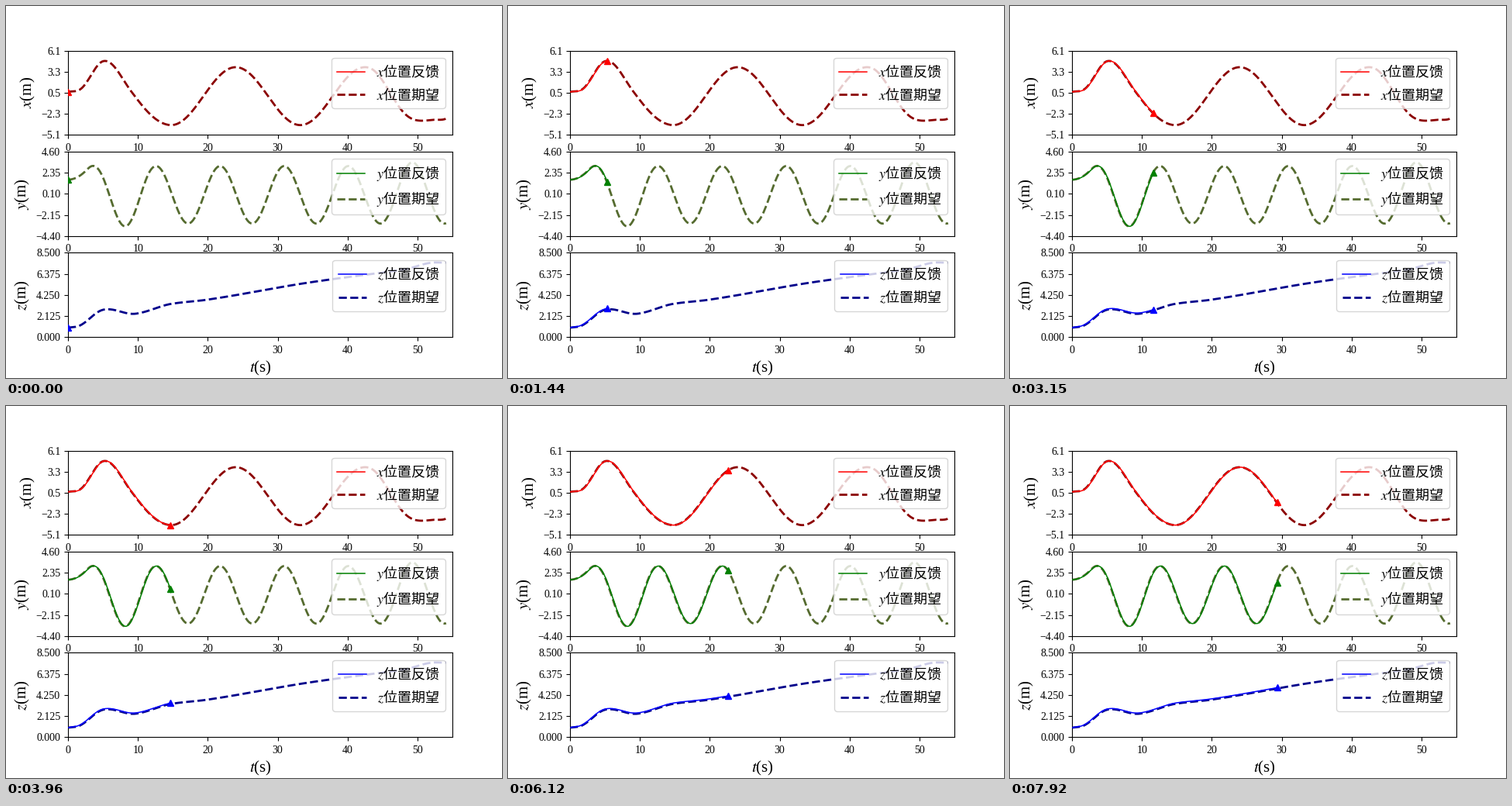
These frames come from a looping animation (640x480 px, 8000 ms). A matplotlib script:

```python
import numpy as np
import matplotlib.pyplot as plt
from matplotlib.animation import FuncAnimation

plt.rcParams.update({
    "font.family": "Liberation Serif",
    "mathtext.fontset": "stix",
    "xtick.major.pad": 4,
})

FRAMES = 89
LOOP_MS = 8000
STEP = 1 / 3  # plotted seconds per frame
T_END = 54.1


def swing(t, *keys):
    """Cosine ease from key to key, each key a (time, value) pair."""
    x, y = np.array(keys).T
    i = np.clip(np.searchsorted(x, t, side="right") - 1, 0, len(x) - 2)
    p = np.clip((t - x[i]) / (x[i + 1] - x[i]), 0, 1)
    return y[i] + (y[i + 1] - y[i]) * (1 - np.cos(np.pi * p)) / 2


def wave(t, size, peak, period):
    return size * np.cos(2 * np.pi * (t - peak) / period)


# Each path is a steady motion plus its run-in and run-out.
def x_path(t):
    return wave(t, 3.85, 24, 18.5) + swing(
        t, (-1, 2.3), (2.3, -0.35), (5.1, 0.9), (9.1, -0.7), (14.5, 0.05),
        (43, 0.05), (47.4, -1.05), (52, 0.72), (55, -0.5))


def y_path(t):
    return wave(t, 3.07, 21.77, 9.17) + swing(
        t, (-1.2, 4.7), (2.9, -0.05), (5.4, 0.43), (8.9, -0.4), (12, 0),
        (46, 0), (49.2, 0.4), (52.5, 0))


def z_path(t):
    return 1.82 + 0.104 * t + swing(
        t, (0, -0.87), (1.1, -0.9), (5.2, 0.42), (9.8, -0.47), (15, 0),
        (20, -0.12), (35, 0.1), (48, 0), (51.8, 0.28), (55, 0))


def late(path):
    return lambda t: path(np.maximum(t - 0.06, 0))


def z_real(t):
    return z_path(t) + 0.08 * (1 - np.exp(-t / 1.5))


ROWS = [
    ("x", x_path, late(x_path), "red", "darkred", (-5.1, 6.1)),
    ("y", y_path, late(y_path), "green", "darkolivegreen", (-4.4, 4.6)),
    ("z", z_path, z_real, "blue", "darkblue", (0, 8.5)),
]

fig, axes = plt.subplots(3, 1, figsize=(6.4, 4.8), dpi=100)
t_all = np.linspace(0, T_END, 542)
tracks = []

for ax, (name, wanted, real, bright, dark, lim) in zip(axes, ROWS):
    line, = ax.plot([], [], color=bright, lw=1.1, zorder=3,
                    label=f"${name}$位置反馈")
    ax.plot(t_all, wanted(t_all), "--", color=dark, lw=2,
            label=f"${name}$位置期望")
    tip, = ax.plot([], [], "^", color=bright, ms=6, zorder=4)
    ax.set_xlim(0, 55)
    ax.set_ylim(*lim)
    ax.set_yticks(np.linspace(*lim, 5))
    ax.set_ylabel(f"${name}$(m)", fontsize=15)
    ax.legend(loc="upper right",
              prop={"family": "Noto Sans CJK JP", "size": 13})
    tracks.append((line, tip, real))
axes[-1].set_xlabel("$t$(s)", fontsize=15)


def draw(k):
    t = np.linspace(0, k * STEP, 4 * k + 1)
    artists = []
    for line, tip, real in tracks:
        v = real(t)
        line.set_data(t, v)
        tip.set_data(t[-1:], v[-1:])
        artists += [line, tip]
    return artists


anim = FuncAnimation(fig, draw, frames=FRAMES, interval=LOOP_MS / FRAMES,
                     init_func=lambda: draw(0), repeat=True, repeat_delay=0)
plt.show()
```
